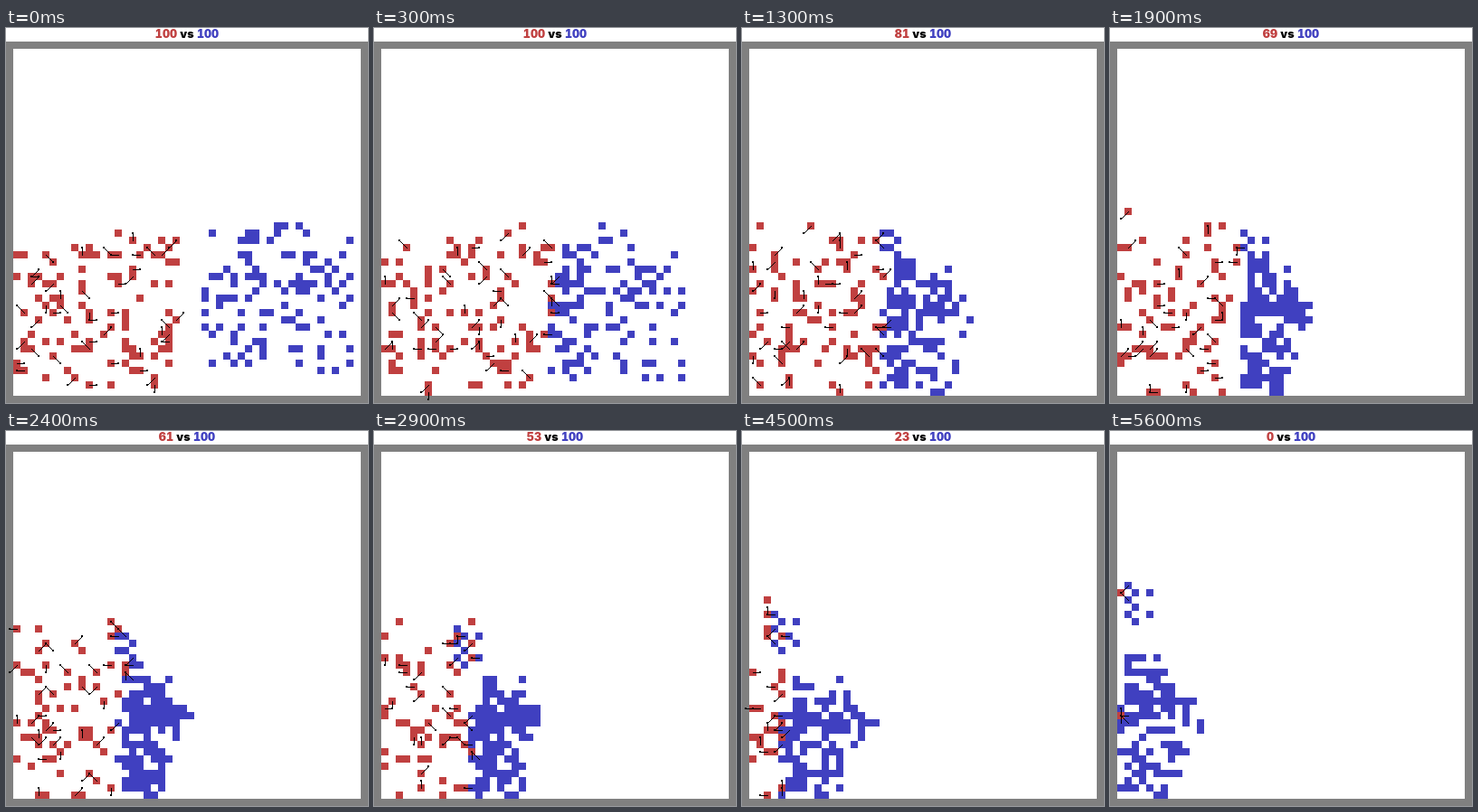
These frames come from a looping animation (400x415 px, 5.7 s). An HTML page with a canvas:

```html
<!DOCTYPE html>
<html lang="en">
<head>
<meta charset="utf-8">
<title>Red vs blue</title>
<style>
  html, body { margin: 0; width: 100%; height: 100%; overflow: hidden; background: #fff; }
  canvas { position: absolute; left: 0; top: 0; }
  #score {
    position: absolute; left: 0; top: 0; width: 400px; text-align: center;
    font: 900 12.5px/13px Inter, "Open Sans", sans-serif;
    font-variant-numeric: tabular-nums; white-space: pre; color: #000;
  }
  #red { color: #c04040; }
  #blue { color: #4040c0; }
</style>
</head>
<body>
<canvas id="stage" width="400" height="415"></canvas>
<div id="score"><span id="red">100</span> vs <span id="blue">100</span></div>
<script>
const SIZE = 48, CELL = 8, LEFT = 8, TOP = 23;
const FRAMES = 57, STEP = 100;
const RED = '#c04040', BLUE = '#4040c0';

let seed = 20117;
function rand() {
  seed = (seed + 0x6d2b79f5) | 0;
  let t = Math.imul(seed ^ (seed >>> 15), 1 | seed);
  t = (t + Math.imul(t ^ (t >>> 7), 61 | t)) ^ t;
  return ((t ^ (t >>> 14)) >>> 0) / 4294967296;
}
const pick = (a, b) => a + Math.floor(rand() * (b - a + 1));
const clamp = v => Math.max(0, Math.min(SIZE - 1, Math.round(v)));
const dist = (a, x, y) => Math.max(Math.abs(a.x - x), Math.abs(a.y - y));

// Linear value through [frame, value] points.
function track(points, f) {
  let i = 1;
  while (i < points.length - 1 && points[i][0] < f) i++;
  const [f0, v0] = points[i - 1], [f1, v1] = points[i];
  return v0 + (v1 - v0) * (f - f0) / (f1 - f0);
}

const COUNT = [[0, 100], [3, 100], [7, 93], [19, 69], [29, 53], [37, 39], [45, 23], [55, 2], [56, 0]];
const FRONT = [[0, 26], [7, 20], [19, 17], [29, 12], [37, 8], [45, 4], [56, 0]];
const BACK = [[0, 46], [6, 37], [7, 34], [12, 31], [18, 26], [24, 22], [29, 20], [37, 19], [45, 16], [56, 12]];
const UPPER = [[0, 24], [7, 27], [19, 28], [29, 30], [37, 31], [45, 30], [56, 26]];
const LOWER = [[0, 44], [7, 47], [56, 47]];
const TAPER = [[0, 0], [7, 0.2], [19, 0.4], [29, 0.2], [45, 0.5], [56, 0.6]];
const SQUAD_X = [[0, 26], [7, 18], [19, 17], [29, 10], [37, 5], [45, 3], [56, 1]];
const SQUAD_Y = [[0, 24], [19, 25], [29, 24], [37, 21], [45, 22], [56, 18]];

const taken = new Set();
const key = (x, y) => y * SIZE + x;
const isFree = (x, y) => x >= 0 && y >= 0 && x < SIZE && y < SIZE && !taken.has(key(x, y));

function move(u, dx, dy) {
  if ((!dx && !dy) || !isFree(u.x + dx, u.y + dy)) return false;
  taken.delete(key(u.x, u.y));
  u.x += dx;
  u.y += dy;
  taken.add(key(u.x, u.y));
  return true;
}

function approach(u, x, y) {
  const dx = Math.sign(x - u.x), dy = Math.sign(y - u.y);
  return move(u, dx, dy) || move(u, dx, 0) || move(u, 0, dy);
}

function scatter(n, x0, x1, y0, y1, keep) {
  const units = [];
  while (units.length < n) {
    const x = pick(x0, x1), y = pick(y0, y1);
    if (!isFree(x, y) || !keep(x, y)) continue;
    taken.add(key(x, y));
    units.push({ x, y });
  }
  return units;
}

function aimReds(reds) {
  for (const r of reds) {
    r.dir = null;
    if (rand() < 0.45) {
      do r.dir = [pick(-1, 1), pick(-1, 1)];
      while (!r.dir[0] && !r.dir[1]);
    }
  }
}

function moveReds(reds, f) {
  const front = Math.round(track(FRONT, f));
  for (const r of reds) {
    if (r.goal && f > 42) {
      approach(r, ...r.goal);
      continue;
    }
    const limit = front + (r.y < 24 ? 4 : 0);
    if (r.x > limit) {
      move(r, -1, pick(-1, 1)) || move(r, -1, 0);
      continue;
    }
    if (r.dir && r.x + r.dir[0] <= limit) move(r, ...r.dir);
    if (rand() < 0.45) {
      const dx = pick(-1, 1);
      if (r.x + dx <= limit) move(r, dx, pick(-1, 1));
    }
  }
}

function moveBlues(blues, f) {
  const front = track(FRONT, f), back = track(BACK, f);
  const upper = track(UPPER, f), lower = track(LOWER, f);
  const taper = track(TAPER, f);
  blues.sort((a, b) => a.x - b.x);
  for (const b of blues) {
    let x, y;
    if (b.squad >= 0) {
      x = track(SQUAD_X, f) + (b.squad % 3) * 1.3;
      y = track(SQUAD_Y, f) + b.squad * 0.7;
    } else {
      y = upper + (lower - upper) * b.row + rand() - 0.5;
      const narrow = 1 - taper * Math.min(1.2, Math.abs(y - 38) / 10);
      x = front + (back - front) * Math.pow(b.depth, f < 19 ? 1.5 : 1.1) * narrow + rand() * 0.8 - 0.4;
    }
    x = clamp(x);
    y = clamp(y);
    for (let i = 0; i < 2; i++) approach(b, x, y);
  }
}

function cull(reds, blues, f) {
  const front = track(FRONT, f);
  const score = r => r.goal ? -99 :
    r.x - front - (r.y < 24 ? 6 : 0) + (blues.some(b => dist(b, r.x, r.y) === 1) ? 4 : 0);
  const ranked = reds.map(r => [score(r), r]).sort((a, b) => a[0] - b[0]);
  const left = ranked.slice(0, Math.round(track(COUNT, f))).map(e => e[1]);
  for (const r of reds) if (!left.includes(r)) taken.delete(key(r.x, r.y));
  return left;
}

function simulate() {
  const frames = [];
  let reds = scatter(100, 0, 22, 25, 46, (x, y) =>
    rand() < (x > 10 && x < 13 ? 0.35 : 1) * (y < 27 ? 0.6 : 1));
  const blues = scatter(100, 26, 46, 24, 44, (x, y) => y > 26 || x > 30 || rand() < 0.4);

  blues.sort((a, b) => a.y - b.y).forEach((b, i) => {
    b.squad = i < 8 ? i : -1;
    b.row = (b.y - 24) / 20;
    b.depth = (b.x - 26) / 20;
  });
  // The last two to fall.
  for (const [x, y, gy] of [[2, 25, 18], [2, 36, 36]]) {
    const near = reds.filter(r => !r.goal).sort((a, b) => dist(a, x, y) - dist(b, x, y))[0];
    near.goal = [0, gy];
  }

  for (let f = 0; f < FRAMES; f++) {
    if (f) {
      moveReds(reds, f);
      moveBlues(blues, f);
    }
    aimReds(reds);
    const marks = reds.filter(r => r.dir).map(r => [r.x, r.y, ...r.dir]);
    for (const b of blues) {
      const foe = reds.find(r => dist(r, b.x, b.y) === 1);
      if (foe && rand() < 0.75) marks.push([b.x, b.y, foe.x - b.x, foe.y - b.y]);
    }
    const copy = u => [u.x, u.y];
    const shown = reds.map(copy);
    reds = cull(reds, blues, f);
    frames.push({ reds: shown, blues: blues.map(copy), marks, count: reds.length });
  }
  return frames;
}

const frames = simulate();
const ctx = document.getElementById('stage').getContext('2d');
const label = document.getElementById('red');

function box(color, x, y, w, h) {
  ctx.fillStyle = color;
  ctx.fillRect(x, y, w, h);
}

function drawCells(color, cells) {
  for (const [x, y] of cells) box(color, LEFT + x * CELL, TOP + y * CELL, CELL, CELL);
}

function drawMark([x, y, dx, dy]) {
  const cx = LEFT + x * CELL + 4, cy = TOP + y * CELL + 4;
  for (let i = 0; i <= CELL; i++) box('#000', cx + dx * i, cy + dy * i, 1, 1);
  box('#000', cx + dx * CELL - 1, cy + dy * CELL - 1, 2, 2);
}

function draw({ reds, blues, marks, count }) {
  box('#fff', 0, 0, 400, 15);
  box('#808080', 0, 15, 400, 400);
  box('#fff', LEFT, TOP, SIZE * CELL, SIZE * CELL);
  drawCells(RED, reds);
  drawCells(BLUE, blues);
  marks.forEach(drawMark);
  label.textContent = count;
}

const start = performance.now();
let last = -1;
function tick() {
  const f = Math.floor((performance.now() - start) / STEP) % FRAMES;
  if (f !== last) draw(frames[last = f]);
  requestAnimationFrame(tick);
}
tick();
</script>
</body>
</html>
```
